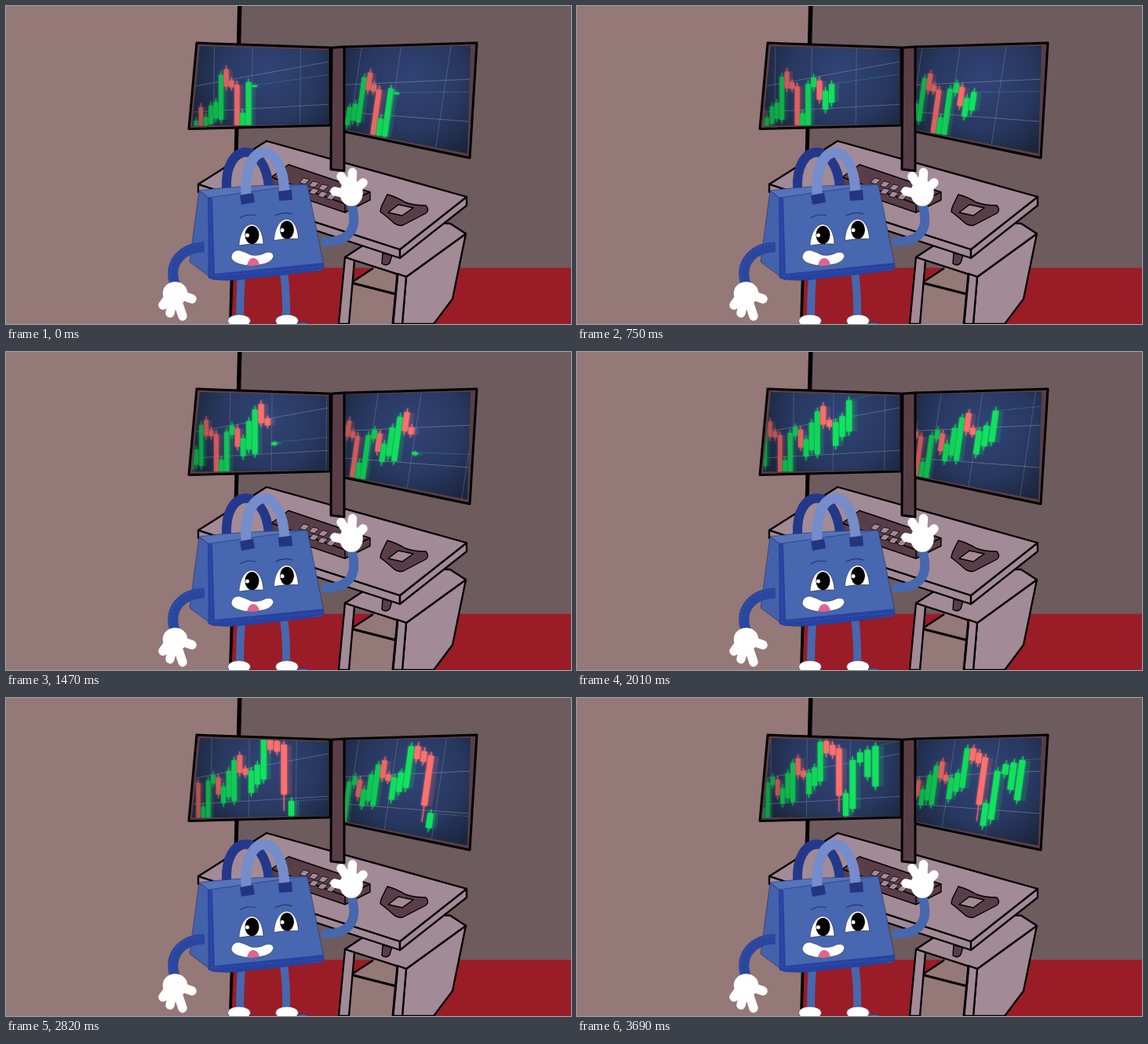
Animation, 720 px wide and 405 px high, one loop 3.72 s. Source, as an HTML page with a canvas:

```html
<!DOCTYPE html>
<html lang="en">
<head>
<meta charset="utf-8">
<title>Trading bag</title>
<style>
html, body { margin: 0; width: 720px; height: 405px; overflow: hidden; }
svg, canvas { position: absolute; left: 0; top: 0; }
.line { stroke: #000; stroke-width: 2.3; stroke-linejoin: round; }
.bold { stroke-width: 3; }
.fine { stroke-width: 1.4; }
.thin { stroke: #27305a; stroke-width: .6; }
.wood { fill: #a28a97; }
.dark { fill: #5a3e47; }
.limb { fill: none; }
.hand { fill: #fff; stroke: #fff; stroke-width: 11.5; stroke-linecap: round; }
.stitch { fill: none; stroke: #5468c0; stroke-width: .8; stroke-dasharray: 1.5 3; }
</style>
</head>
<body>
<svg width="720" height="405" viewBox="0 0 720 405">
  <!-- room -->
  <rect width="720" height="405" fill="#6e5b5d"/>
  <rect x="280" y="333.500" width="440" height="72" fill="#9a1c27"/>
  <path d="M0 0H297L286 405H0Z" fill="#957878"/>
  <path d="M295 0H300.500L296 175L287.500 405H284L291 175Z"/>

  <!-- cabinet -->
  <g class="line wood">
    <path d="M442 350L470 333L498 343L494 405H437Z" fill="#957878" stroke="none"/>
    <path d="M510 345L586 290L569 373L545 405H505Z"/>
    <path d="M432 320L500 275L566 277L586 290L510 345Z"/>
    <path d="M432 320L444 324L437 405H424Z"/>
    <path d="M499 341L510 345L505 405H493Z"/>
    <path class="bold" d="M442 353L497 367M499 341L493 405"/>
    <path d="M442 351L468 334" fill="none"/>
    <path class="dark fine" d="M480 315L492 317L489 327Q485 332 479 328Z"/>
  </g>

  <!-- desk -->
  <g class="line wood">
    <path d="M245 227L502 310V321L245 237Z"/>
    <path d="M502 310L587 243V254L502 321Z"/>
    <path d="M245 227L332 172L587 243L502 310Z"/>
  </g>
  <g class="line dark fine">
    <path d="M338 218L360 202L464 237V247L432 263L338 231Z"/>
    <path d="M338 218L432 252L464 237M432 252V263" fill="none"/>
    <path d="M486 240Q497 243 509 250Q519 254 535 254Q540 260 535 264L506 279Q500 281 494 276Q484 267 477 262Q477 258 480 252Z"/>
    <path class="wood" d="M487 263L500 253L519 257L505 267Z"/>
  </g>
  <g fill="#a28a97" stroke="#000" stroke-width=".8">
    <path id="key" d="M374 225L379 219L387 221L381 227Z"/>
    <use href="#key" x="12" y="4"/><use href="#key" x="24" y="8"/><use href="#key" x="36" y="12"/>
    <use href="#key" x="12" y="13"/><use href="#key" x="23" y="17"/><use href="#key" x="34" y="20"/>
  </g>

  <!-- monitors -->
  <g class="line dark bold">
    <path d="M243 47L413 53V152L233 156.500Z"/>
    <path d="M431 52L600 47L591 193.500L431 160Z"/>
    <path d="M415 53L431 52V210L414 208Z"/>
  </g>

  <!-- legs and shoes -->
  <g class="limb" stroke="#4767ae" stroke-width="10">
    <path d="M300 344Q298 370 298 398"/>
    <path d="M354 339Q358 370 357 398"/>
  </g>
  <g fill="#fff" class="thin">
    <ellipse cx="378" cy="406" rx="9" ry="3" fill="#4767ae"/>
    <ellipse cx="297" cy="401" rx="14.500" ry="8"/>
    <ellipse cx="358" cy="401" rx="14.500" ry="8"/>
  </g>

  <!-- bag -->
  <path class="limb" d="M281 233C278 172 330 170 335 231" stroke="#24388b" stroke-width="12"/>
  <g class="thin">
    <path d="M246 235L259 245L265 349L234 326Z" fill="#4461ab"/>
    <path d="M246 235Q300 228 382 227L385 229L259 245Z" fill="#5574bd"/>
    <path d="M259 244L380 227Q384 227 385 232L405 330Q406 336 401 337L292 349Q266 350 258 346Z" fill="#4767b0"/>
    <path d="M257 243L263 245L266 341L404 327L405 335Q370 342 292 349Q266 350 258 346Z" fill="#2742a0" stroke="none"/>
  </g>
  <path class="stitch" d="M260 248L262 344L402 332"/>
  <path class="limb" d="M306 242C301 170 353 167 355 239" stroke="#758dcb" stroke-width="13"/>
  <path d="M298 241L315 238L317 250L300 253ZM347 236L364 234L365 247L348 248Z" fill="#24357f"/>

  <!-- face -->
  <path d="M298 270Q307 264 318 267M343 267Q354 261 365 265" fill="none" stroke="#25366f" stroke-width="1.200"/>
  <g id="eye">
    <path d="M297 305C299 271 326 268 328 303Q313 302 297 305Z" fill="#fff" stroke="#111" stroke-width=".5"/>
    <ellipse cx="313.500" cy="291.500" rx="9" ry="11.500"/>
    <circle cx="307.500" cy="292" r="2.500" fill="#fff"/>
  </g>
  <use href="#eye" x="44.500" y="-6.500"/>
  <path d="M287 320Q288 311 297 311Q304 313 312 317Q322 319 331 314Q340 312 341 319Q338 327 326 329Q310 333 296 328Q288 325 287 320Z" fill="#fff" stroke="#222" stroke-width=".5"/>
  <path d="M307 330Q310 320 316 321Q321 322 323 329Q315 332 307 330Z" fill="#e0648f"/>

  <!-- arms and hands -->
  <path class="limb" d="M253 307C226 307 206 326 215 354" stroke="#2a479f" stroke-width="13"/>
  <path class="stitch" d="M253 303C224 303 204 324 210 352"/>
  <path class="limb" d="M402 300C437 302 450 285 440 252" stroke="#4767ae" stroke-width="12"/>
  <g class="hand">
    <ellipse cx="440" cy="238" rx="9" ry="11"/>
    <path d="M440 236L427 217M440 236L441.500 212M442 238L455 225M436 240L419 236"/>
    <ellipse cx="215.500" cy="366" rx="10" ry="9"/>
    <path d="M211 366L200 381M214 370L209 391M216 368L225 395M217 366L237 373"/>
  </g>
</svg>
<canvas id="screens" width="720" height="405"></canvas>
<script>
const ctx = document.getElementById('screens').getContext('2d');
const LOOP = 3720, STEP = 30, CANDLE_TIME = 207, FIRST = -10, BASE = 150;
const GREEN = [18, 226, 94], RED = [255, 112, 110];

// Open and close price of each candle; optional extra length of the lower wick.
const candles = [
  [-4, 5], [26, -5], [-5, 10], [0, 27], [8, 32], [6, 70], [76, 52], [59, 50], [52, -8], [-8, 14],
  [-8, 53], [48, 60], [55, 31], [18, 41], [26, 62], [20, 75], [80, 57], [61, 53], [29, 57], [39, 63],
  [44, 94], [93, 78], [86, 74], [80, 24, 16], [0, 26], [8, 63], [59, 70], [42, 71], [31, 82]
];

// Perspective: slots widen and prices stretch towards the right.
const slotX = u => 243 + 6.3 * u + .0041 * u ** 3;
const priceY = (price, x) => BASE - price * (1 + .003 * (x - 310));

function line(x1, y1, x2, y2, color, dash = []) {
  ctx.strokeStyle = color;
  ctx.setLineDash(dash);
  ctx.beginPath();
  ctx.moveTo(x1, y1);
  ctx.lineTo(x2, y2);
  ctx.stroke();
}

function priceLine(price, from, color, dash) {
  line(from, priceY(price, from), 425, priceY(price, 425), color, dash);
}

function drawCandle(u, open, close, tail = 0) {
  const x = slotX(u), w = .85 * (6 + .17 * u);
  const high = Math.max(open, close), low = Math.min(open, close);
  const top = priceY(high, x), bottom = priceY(low, x);
  const wick = Math.min(5, (high - low) / 2);
  // Candles dim and blur towards the left edge.
  const light = Math.min(1, .72 + u * .025);
  const color = (close >= open ? GREEN : RED).map(c => c * light);
  ctx.fillStyle = ctx.shadowColor = `rgb(${color})`;
  ctx.globalAlpha = .17;
  ctx.fillRect(x + w / 2, top, w * .9, bottom - top);
  ctx.globalAlpha = Math.min(1, light + .1);
  ctx.shadowBlur = 3;
  ctx.fillRect(x - w / 2, top, w, Math.max(2, bottom - top));
  ctx.fillRect(x - .5, top - wick, 1, bottom - top + 2 * wick + tail);
  ctx.globalAlpha = 1;
  ctx.shadowBlur = 0;
}

function drawChart(t) {
  const shade = ctx.createRadialGradient(335, 85, 10, 335, 85, 105);
  shade.addColorStop(0, '#2f4273');
  shade.addColorStop(.55, '#283860');
  shade.addColorStop(1, '#1b253d');
  ctx.fillStyle = shade;
  ctx.fillRect(190, 0, 300, 230);

  const scroll = 9.85 * (1 - t / 3690);
  ctx.lineWidth = .8;
  for (let i = -6.35; i < 24; i += 7) {
    const x = slotX(i + scroll);
    line(x + .5, 30, x - 1, 190, 'rgba(170,180,215,.32)');
  }
  priceLine(60.6, 225, 'rgba(190,190,220,.4)');
  priceLine(19, 225, 'rgba(190,190,220,.4)');

  const current = 1 + Math.floor(t / CANDLE_TIME);
  candles.forEach(([open, close, tail], n) => {
    const i = n + FIRST;
    if (i > current) return;
    const u = i + scroll;
    if (i < current) return drawCandle(u, open, close, tail);
    const price = open + (close - open) * (t / CANDLE_TIME % 1);
    priceLine(price, slotX(u), close > open ? 'rgba(60,205,150,.65)' : 'rgba(225,130,150,.6)', [1.5, 1.5]);
    drawCandle(u, open, price);
  });
}

function drawScreen(outline, matrix, t) {
  ctx.save();
  ctx.clip(new Path2D(outline));
  ctx.transform(...matrix);
  drawChart(t);
  ctx.restore();
}

function frame(now) {
  const t = Math.floor(now % LOOP / STEP) * STEP;
  ctx.clearRect(0, 0, 720, 405);
  drawScreen('M247 51L411 56V150.500L237 152.500Z', [1, 0, 0, 1, 0, 0], t);
  drawScreen('M433 54L592 50.500L588 188L432 157.500Z', [1.011, .135, -.14, 1, 191.9, -33.6], t);
  requestAnimationFrame(frame);
}
requestAnimationFrame(frame);
</script>
</body>
</html>
```
